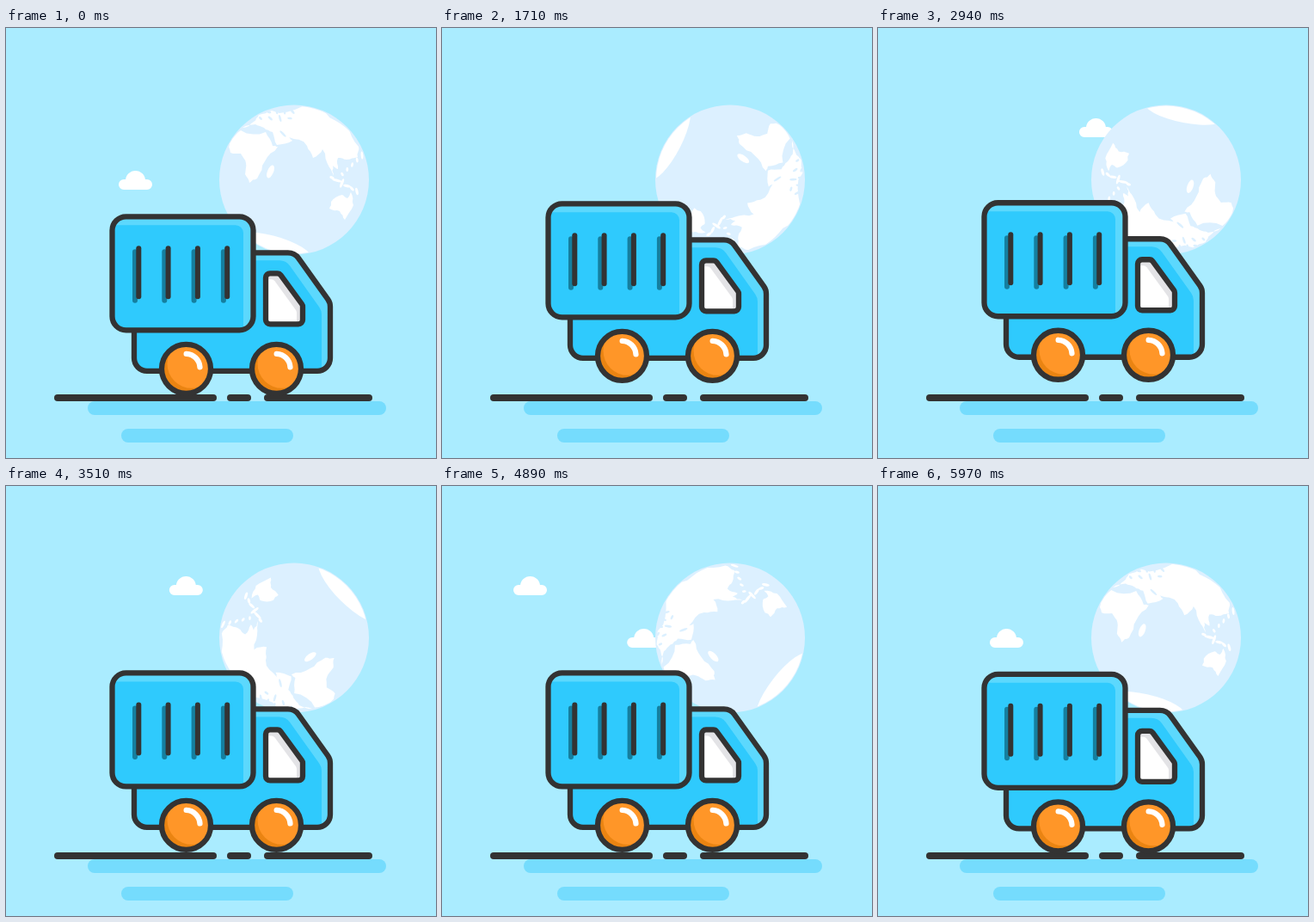
These frames come from a looping animation (500 by 500 pixels, 6000 ms). An HTML page with a canvas:

```html
<!DOCTYPE html>
<html lang="en">
<head>
<meta charset="utf-8">
<title>Delivery truck</title>
<style>
html, body { margin: 0; width: 100%; height: 100%; overflow: hidden; background: #aaecff; }
canvas { display: block; width: 500px; height: 500px; }
</style>
</head>
<body>
<canvas id="stage" width="500" height="500"></canvas>
<script>
const ctx = document.getElementById('stage').getContext('2d');
const LOOP = 6000, STEP = 30, HOP = 600, TAU = Math.PI * 2;
const SKY = '#aaecff', DARK = '#333333', BLUE = '#2fcafd', LIGHT = '#5cd8fd';
const SHADE = '#75dcfd', SEA = '#dcf0ff';
const GLOBE = { x: 335, y: 176.5, r: 87 };

const clamp = v => Math.max(0, Math.min(1, v));

function random(seed) {
  return () => (seed = (seed * 16807) % 2147483647) / 2147483647;
}

const parse = text => text.split(' ').map(p => p.split(',').map(Number));

// Polygon with every corner rounded.
function rounded(points, r, dx = 0, dy = 0) {
  const path = new Path2D();
  const pts = points.map(([x, y]) => [x + dx, y + dy]);
  const [a, b] = [pts[0], pts[pts.length - 1]];
  path.moveTo((a[0] + b[0]) / 2, (a[1] + b[1]) / 2);
  pts.forEach((p, i) => path.arcTo(...p, ...pts[(i + 1) % pts.length], r));
  path.closePath();
  return path;
}

// Joins key points with a rough coast by moving the middle of each side.
function coast(text, seed) {
  const rnd = random(seed);
  let pts = parse(text);
  for (let pass = 0; pass < 2; pass++) {
    pts = pts.flatMap(([x, y], i) => {
      const [u, v] = pts[(i + 1) % pts.length];
      const k = (rnd() - 0.5) * 0.25;
      return [[x, y], [(x + u) / 2 + (v - y) * k, (y + v) / 2 - (u - x) * k]];
    });
  }
  return new Path2D('M' + pts.join(' ') + 'Z');
}

function blob(path, x, y, rx, ry, turn) {
  const part = new Path2D();
  part.ellipse(x, y, rx, ry, turn, 0, TAU);
  path.addPath(part);
}

// A row of small uneven spots from one place to another.
function chain(path, x0, y0, x1, y1, count, size, seed) {
  const rnd = random(seed);
  for (let i = 0; i < count; i++) {
    const k = i / (count - 1);
    const x = x0 + (x1 - x0) * k, y = y0 + (y1 - y0) * k;
    blob(path, x, y, size * (0.8 + rnd()), size * 0.45, rnd() * 2);
  }
}

const eurasia = coast('275,116 288,109 294,101 309,96 345,91 372,99 394,115 410,138 ' +
  '409,150 396,153 386,151 386,164 380,160 381,172 376,162 368,141 357,151 350,137 ' +
  '329,127 333,131 315,136 310,121 300,116 290,112', 11);
const africa = coast('273,119 302,121 310,137 316,138 301,155 292,175 283,180 ' +
  '278,170 279,157 273,146 261,145 260,132', 5);
const australia = coast('376,210 378,202 391,194 397,198 401,191 404,206 394,223 388,213', 7);
const islands = new Path2D(), seas = new Path2D();
blob(islands, 307, 257, 50, 16, 0.25);
blob(islands, 307.5, 167, 3.5, 8, 0.4);
chain(islands, 379, 174, 408, 190, 6, 3.5, 9);
chain(islands, 391, 170, 414, 148, 5, 3, 4);
chain(seas, 296, 105, 330, 105, 4, 3, 3);
chain(seas, 306, 98, 333, 97, 4, 3, 8);
blob(seas, 322, 123, 5, 1.3, 0.8);

const cabPoints = parse('149,330 149,398.5 377,398.5 377,319 335.6,261 270,261 270,330');
const panePoints = parse('302,285 318,285 345,322 345,344 302,344');
const boxPoints = parse('123.5,219 287.5,219 287.5,351 123.5,351');
const cab = [rounded(cabPoints, 15), rounded(cabPoints, 15, -10, 9)];
const pane = [rounded(panePoints, 5), rounded(panePoints, 5, -7, 7)];
const box = [rounded(boxPoints, 16), rounded(boxPoints, 9, -11.5, 10)];

function bar(x, y, w, h, color) {
  ctx.fillStyle = color;
  ctx.beginPath();
  ctx.roundRect(x, y, w, h, Math.min(w, h) / 2);
  ctx.fill();
}

function disc(x, y, r, color) {
  ctx.fillStyle = color;
  ctx.beginPath();
  ctx.arc(x, y, r, 0, TAU);
  ctx.fill();
}

// Outlined shape whose inner part leaves a strip of the edge colour.
function panel([outer, inner], edge, main) {
  ctx.save();
  ctx.clip(outer);
  ctx.fillStyle = edge;
  ctx.fill(outer);
  ctx.fillStyle = main;
  ctx.fill(inner);
  ctx.restore();
  ctx.stroke(outer);
}

function cloud(x, y, alpha) {
  ctx.globalAlpha = clamp(alpha);
  ctx.fillStyle = '#fff';
  ctx.beginPath();
  ctx.roundRect(x, y + 10, 39, 12, 6);
  ctx.moveTo(x + 8, y + 11.5);
  ctx.arc(x + 19.5, y + 11.5, 11.5, Math.PI, TAU);
  ctx.fill();
  ctx.globalAlpha = 1;
}

function clouds(t) {
  cloud(461.5 - 0.0774 * t, 105, Math.min((t - 60) / 400, (5830 - t) / 800));
  cloud(131 - 0.0738 * t, 166, (1500 - t) / 1260);
  cloud(601 - 0.0789 * t, 166, (t - 1840) / 400);
}

function globe(t) {
  const { x, y, r } = GLOBE;
  disc(x, y, r, SEA);
  ctx.save();
  ctx.beginPath();
  ctx.arc(x, y, r - 1, 0, TAU);
  ctx.clip();
  ctx.translate(x, y);
  ctx.rotate(t / LOOP * TAU);
  ctx.translate(-x, -y);
  ctx.fillStyle = '#fff';
  for (const land of [eurasia, africa, australia, islands]) ctx.fill(land);
  ctx.fillStyle = SEA;
  ctx.fill(seas);
  ctx.restore();
}

function wheel(x) {
  const y = 396, r = 28.5;
  ctx.save();
  ctx.beginPath();
  ctx.arc(x, y, r, 0, TAU);
  ctx.clip();
  disc(x, y, r, '#ea8412');
  disc(x + 6.5, y - 6, r, '#ff9628');
  ctx.restore();
  ctx.beginPath();
  ctx.arc(x, y, r, 0, TAU);
  ctx.stroke();
  ctx.save();
  ctx.strokeStyle = '#fff';
  ctx.beginPath();
  ctx.arc(x - 0.5, y - 1, 16.5, -1.53, -0.06);
  ctx.stroke();
  ctx.restore();
}

function truck(t) {
  const rise = 1 - Math.abs(1 - t / HOP % 2);
  ctx.save();
  ctx.translate(0, 0.3 - 18.2 * rise ** 1.2);
  ctx.lineCap = ctx.lineJoin = 'round';
  ctx.strokeStyle = DARK;
  ctx.lineWidth = 6.3;
  panel(cab, LIGHT, BLUE);
  panel(pane, '#e3e3e6', '#fff');
  panel(box, LIGHT, BLUE);
  for (let i = 0; i < 4; i++) {
    const x = 151.3 + i * 34.3;
    bar(x - 4.3, 257, 6, 62.5, '#157f9f');
    bar(x, 253, 6, 62, DARK);
  }
  wheel(209.5);
  wheel(314.5);
  ctx.restore();
}

function ground() {
  bar(95, 434, 347, 16, SHADE);
  bar(134, 466, 200, 16, SHADE);
  bar(56, 426, 189, 8, DARK);
  bar(257, 426, 28, 8, DARK);
  bar(300, 426, 126, 8, DARK);
}

function draw(t) {
  ctx.fillStyle = SKY;
  ctx.fillRect(0, 0, 500, 500);
  clouds(t);
  globe(t);
  ground();
  truck(t);
}

const start = performance.now();
function tick() {
  const t = (performance.now() - start) % LOOP;
  draw(Math.floor(t / STEP) * STEP);
  requestAnimationFrame(tick);
}
tick();
</script>
</body>
</html>
```
